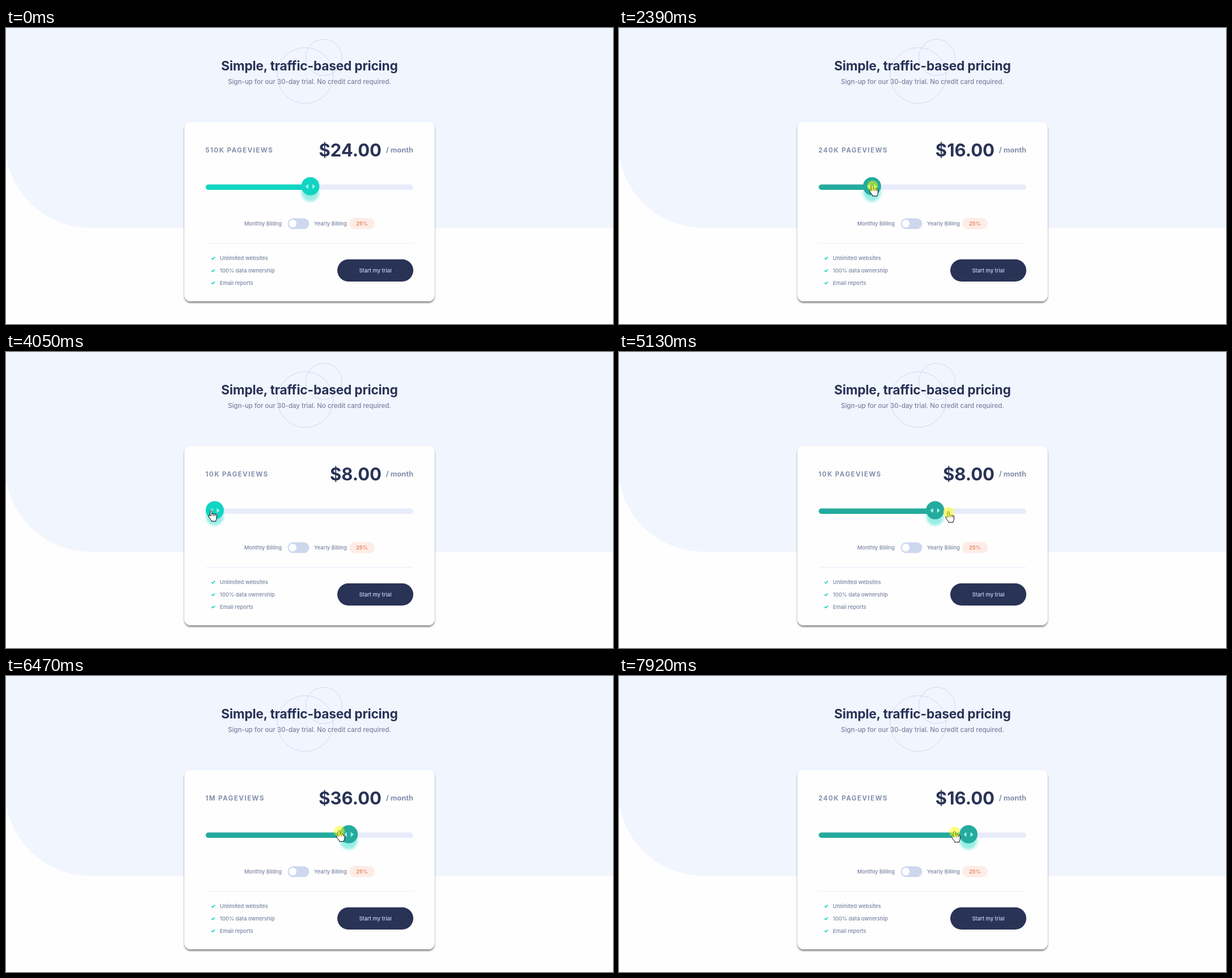
An HTML page for the animation above (7.99 s loop, 1070 by 523 pixels).

```html
<!DOCTYPE html>
<html lang="en">
<head>
<meta charset="utf-8">
<title>Pricing slider</title>
<style>
  html, body { margin: 0; width: 100%; height: 100%; overflow: hidden; background: #fefefe; }
  svg { display: block; width: 100%; height: 100%; }
  text { font-family: Inter, sans-serif; fill: #7b84a2; font-size: 9.4px; font-weight: 500; }
  .middle { text-anchor: middle; }
  .end { text-anchor: end; }
  .title { font-size: 22.7px; font-weight: 700; letter-spacing: -.2px; fill: #293356; }
  .subtitle { font-size: 11.5px; }
  .views { font-size: 11.5px; font-weight: 700; letter-spacing: 1.47px; fill: #858fad; }
  .price { font-size: 31px; font-weight: 700; fill: #293356; }
  .month { font-size: 12.8px; font-weight: 700; fill: #858fad; }
  .badge { font-size: 9.2px; font-weight: 700; fill: #e98b69; }
  .button { fill: #c9d5fb; }
</style>
</head>
<body>
<svg viewBox="0 0 1070 523" xmlns="http://www.w3.org/2000/svg">
  <defs>
    <filter id="cardShadow" x="-5%" y="-5%" width="110%" height="112%">
      <feDropShadow dx="0" dy="2.5" stdDeviation="1.5" flood-color="#000" flood-opacity=".5"/>
    </filter>
    <filter id="blur" x="-50%" y="-50%" width="200%" height="200%">
      <feGaussianBlur stdDeviation="2.3"/>
    </filter>
  </defs>

  <rect width="1070" height="523" fill="#fefefe"/>
  <rect x="-1.5" y="-200" width="1300" height="553" rx="150" fill="#f1f5fe"/>
  <g fill="none" stroke="#cfd8ef">
    <circle cx="527.3" cy="84" r="49.3"/>
    <circle cx="560.3" cy="52" r="32"/>
  </g>
  <text class="title middle" x="535" y="75">Simple, traffic-based pricing</text>
  <text class="subtitle middle" x="535" y="99.3">Sign-up for our 30-day trial. No credit card required.</text>

  <rect x="314.5" y="166" width="441" height="317" rx="11" fill="#fefefe" filter="url(#cardShadow)"/>
  <text class="views" id="views" x="351.5" y="219.8"></text>
  <text class="price end" id="price" x="662" y="227"></text>
  <text class="month end" x="718" y="219.8">/ month</text>

  <rect x="352" y="276.5" width="366" height="9.5" rx="4.75" fill="#e8ecfa"/>
  <rect id="fill" x="352" y="276.5" height="9.5" rx="4.75"/>
  <g id="thumb">
    <circle cy="291" r="15.5" fill="#10d8c4" opacity=".42" filter="url(#blur)"/>
    <circle id="knob" cy="279.6" r="16"/>
    <path d="M-3.5 275.7V284.3L-8.7 280ZM3.5 275.7V284.3L8.7 280Z" fill="#a2f3eb"/>
  </g>

  <text x="420" y="349">Monthly Billing</text>
  <rect x="496.5" y="336.2" width="38" height="19" rx="9.5" fill="#cdd7ee"/>
  <circle cx="505.4" cy="345.6" r="6.8" fill="#fefefe"/>
  <text x="543" y="349">Yearly Billing</text>
  <rect x="605" y="335.5" width="45" height="20" rx="10" fill="#feece6"/>
  <text class="badge middle" x="627.3" y="349">25%</text>

  <path d="M352 380.5H718" stroke="#eaeefb"/>
  <g id="features"></g>
  <rect x="584" y="408.7" width="134" height="39.3" rx="19.65" fill="#293356"/>
  <text class="button middle" x="651" y="431.8">Start my trial</text>

  <g id="cursor">
    <path id="arrow" d="M.5.5V16.5L4.2 13L6.6 18.5L9 17.4L6.7 12.2H11.7Z" fill="#fff" stroke="#000"/>
    <g id="hand" stroke="#000" transform="translate(0 -1)">
      <path d="M-2 10V1.5a1.5 1.5 0 0 1 3 0V6q1.5-1.2 3 .2q1.6-1 2.9.4q2-.6 2.6 1.2V13q0 2.5-1.5 4.5V19H0V17.5q-3-3-5-7q-.6-2 .8-2.2q1.2 0 2.2 1.8Z" fill="#fff"/>
      <path d="M1 6V10M4 6.2V10M6.9 6.6V10" fill="none" stroke-width=".9"/>
    </g>
    <circle id="halo" r="9.5" fill="#ff0" opacity=".5"/>
  </g>
</svg>
<script>
const $ = id => document.getElementById(id);
const LOOP = 7990, STEP = 70;
const ENTER = 390, HOVER = 1230;
const LAG = 26;                 // the thumb trails the pointer
const MIN_X = 368, MAX_X = 702; // limits of the thumb centre

// The plan takes effect when the thumb is released.
const drags = [
  { press: 1430, release: 2050, views: '240K', price: 16 },
  { press: 2320, release: 3090, views: '90K', price: 12 },
  { press: 3420, release: 4050, views: '10K', price: 8 },
  { press: 4780, release: 5630, views: '1M', price: 36 },
  { press: 5980, release: 7160, views: '240K', price: 16 },
  { press: 7430, release: LOOP }
];

const approach = { from: ENTER, to: 1160, x: 532, y: 272.5 };
const strokes = [
  { from: 1640, to: 2000, x: 447, y: 279 },
  { from: 2390, to: 2950, x: 395.5, y: 280 },
  { from: 3490, to: 3900, x: 362, y: 281 },
  { from: 4780, to: 5390, x: 721, y: 284.5 },
  { from: 5650, to: 5960, x: 721, y: 268 },
  { from: 6175, to: 6775, x: 447.2, y: 281 },
  { from: 7430, to: 7780, x: 657, y: 278 },
  { from: 7825, to: 7995, x: 546, y: 274 }
];

const clamp = (value, low, high) => Math.min(high, Math.max(low, value));
const ease = p => p * p * (3 - 2 * p);

function travel(start, moves, t) {
  return moves.reduce((point, { from, to, x, y }) => {
    const k = ease(clamp((t - from) / (to - from), 0, 1));
    return { x: point.x + (x - point.x) * k, y: point.y + (y - point.y) * k };
  }, start);
}

function show(id, visible) {
  $(id).setAttribute('visibility', visible ? 'visible' : 'hidden');
}

function render(t) {
  const drag = drags.filter(d => d.press <= t).pop();
  const plan = drags.filter(d => d.release <= t).pop() || { views: '510K', price: 24 };
  const pressed = Boolean(drag) && t < drag.release;
  const color = pressed ? '#24ab9d' : '#10d5c2';

  // Motion advances in held steps counted from the latest press.
  const start = drag ? drag.press : ENTER;
  const held = start + Math.floor((t - start) / STEP) * STEP;
  const pointer = travel({ x: 1039, y: 496 }, [approach, ...strokes], held);
  const thumbX = clamp(travel({ x: 537.5, y: 0 }, strokes, held - LAG).x - 1, MIN_X, MAX_X);

  $('views').textContent = `${plan.views} PAGEVIEWS`;
  $('price').textContent = `$${plan.price}.00`;
  $('fill').setAttribute('width', thumbX - 352);
  $('fill').setAttribute('fill', color);
  $('knob').setAttribute('fill', color);
  $('thumb').setAttribute('transform', `translate(${thumbX} 0)`);
  $('cursor').setAttribute('transform', `translate(${pointer.x} ${pointer.y})`);
  show('arrow', t >= ENTER && t < HOVER);
  show('hand', t >= HOVER);
  show('halo', pressed);
}

$('features').innerHTML = ['Unlimited websites', '100% data ownership', 'Email reports']
  .map((label, i) => {
    const y = 406.7 + i * 21.8;
    return `<path d="M362.4 ${y - .2}l2 2l3.8-3.8" fill="none" stroke="#10d5c2" stroke-width="1.7"/>
      <text x="377" y="${y + 3.6}">${label}</text>`;
  }).join('');

const origin = performance.now();
function tick() {
  render((performance.now() - origin) % LOOP);
  requestAnimationFrame(tick);
}
tick();
</script>
</body>
</html>
```
